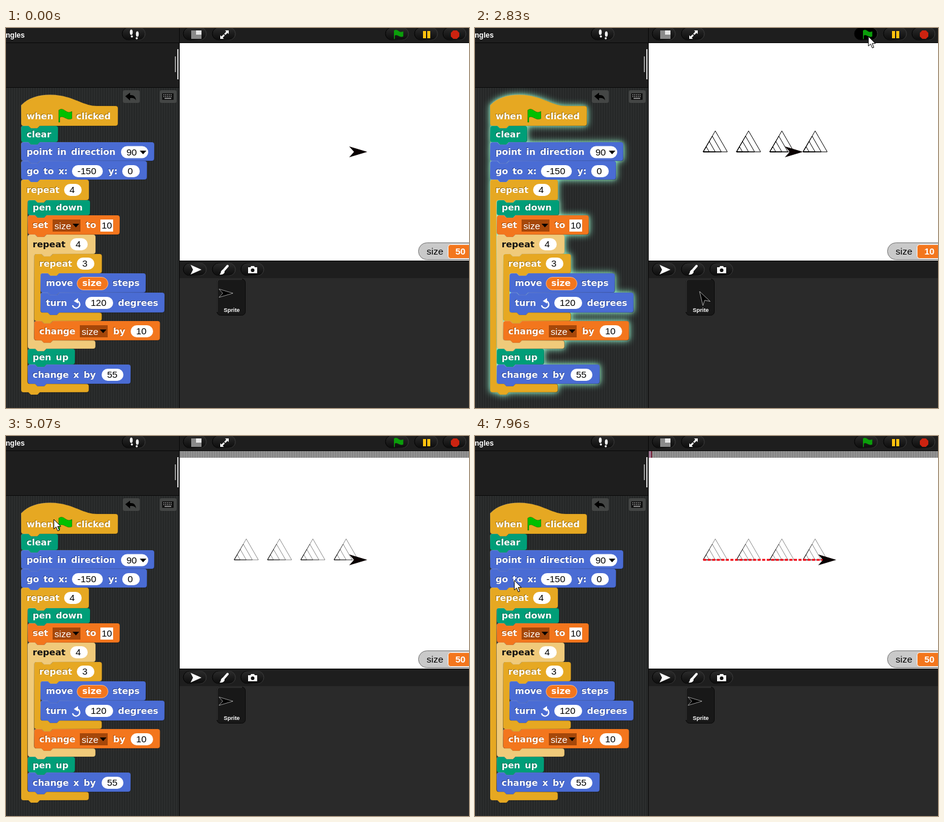
Write an HTML page that moves like this. It is 765 by 629 pixels and loops after 8000 ms.

```html
<!DOCTYPE html>
<html lang="en">
<head>
<meta charset="utf-8">
<title>Triangles</title>
<style>
  html, body { margin: 0; width: 100%; height: 100%; overflow: hidden; background: #1e1e1e; }
  svg { display: block; }
  text { white-space: pre; }
  .label { font: bold 14.6px "DejaVu Sans", sans-serif; word-spacing: 2.5px; }
  .input { font: 15.5px "Liberation Sans", Arial, sans-serif; }
  .bold { font: bold 15px "Liberation Sans", Arial, sans-serif; }
  .glow { filter: drop-shadow(0 0 2px #99ffd566) drop-shadow(0 0 6px #99ffd5); }
</style>
</head>
<body>
<svg id="stage" width="765" height="629" viewBox="0 0 765 629">
  <defs>
    <linearGradient id="bevel" x2="1" y2="1">
      <stop stop-color="#fff" stop-opacity=".2"/>
      <stop offset=".5" stop-color="#000" stop-opacity=".08"/>
      <stop offset="1" stop-color="#000" stop-opacity=".35"/>
    </linearGradient>
    <linearGradient id="pill" x2="0" y2="1">
      <stop stop-color="#2c2c2c"/><stop offset="1" stop-color="#0c0c0c"/>
    </linearGradient>
    <linearGradient id="rim" x2="1" y2="0">
      <stop stop-color="#000"/><stop offset="1" stop-color="#3c3c3c"/>
    </linearGradient>
    <pattern id="weave" width="4" height="4" patternUnits="userSpaceOnUse">
      <path fill="#252727" d="M0 0h4v4H0z"/><path fill="#2c2e2e" d="M1 0h2v4H1z"/>
    </pattern>
    <pattern id="ticks" width="4" height="12" patternUnits="userSpaceOnUse">
      <path fill="#929292" d="M0 0h4v12H0z"/><path fill="#7d7d7d" d="M0 0h1v12H0z"/>
    </pattern>
    <path id="arrow" d="M0 0-30-9-22 0-30 9Z"/>
    <path id="flag" d="M0 1C4-2 7-1 11 2S18 5 22 3L22 15C18 17 15 16 11 14S5 11 2 13V21H0Z"/>
  </defs>
</svg>
<script>
const LOOP = 8000;
const GOLD = '#e6a822', PALE = '#f0ca7a', PEN = '#009e78', MOTION = '#4a6cd4', VARS = '#f3761d';
const svg = document.getElementById('stage');
const add = html => svg.insertAdjacentHTML('beforeend', html);
const $ = id => document.getElementById(id);

const rect = (x, y, w, h, fill, more = '') =>
  `<rect x="${x}" y="${y}" width="${w}" height="${h}" fill="${fill}" ${more}/>`;
const text = (x, y, s, cls, fill, more = '') =>
  `<text x="${x}" y="${y}" class="${cls}" fill="${fill}" ${more}>${s}</text>`;
const shape = (d, fill, more = '') => `<path d="${d}" fill="${fill}" ${more}/>`;
const line = (d, color, width = 1, more = '') =>
  shape(d, 'none', `stroke="${color}" stroke-width="${width}" ${more}`);

// block outlines
const DENT = 'h8l4 4h11l4-4', NOTCH = 'l-4 4h-11l-4-4';
const top_ = (x, y, w) => `M${x} ${y + 4}q0-4 4-4${DENT}H${x + w - 4}q4 0 4 4`;
const bottom = (x, y, w) => `V${y - 4}q0 4-4 4H${x + 31}${NOTCH}H${x + 4}q-4 0-4-4Z`;
const solid = (d, fill) => shape(d, fill) + line(d, 'url(#bevel)', 1.2);
const block = (x, y, w, h, fill) => solid(top_(x, y, w) + bottom(x, y + h, w), fill);
const loop = (x, y, head, foot, fill) => {
  const w = 112, ix = x + 10.5;
  return solid(top_(x, y, w) +
    `V${head - 4}q0 4-4 4H${ix + 31}${NOTCH}H${ix + 4}q-4 0-4 4V${foot - 4}q0 4 4 4` +
    `H${x + w - 4}q4 0 4 4` + bottom(x, foot + 14, w), fill);
};
const label = (x, y, s, fill = '#fff') =>
  (fill === '#fff' ? text(x - 1, y - 1, s, 'label', '#000', 'opacity=".3"') : '') +
  text(x, y, s, 'label', fill);
const field = (x, cy, w, s) =>
  rect(x, cy - 10, w, 20, '#fff', 'rx="10"') + text(x + 9, cy + 5, s, 'input', '#000');
const menu = (x, y) => rect(x, y, 46, 20, '#a5470a') +
  text(x + 3, y + 15.5, 'size', 'input', '#fff') +
  shape(`M${x + 33} ${y + 7}h11l-5.5 6z`, '#000');

// toolbar and panes
const button = (cx, cy, id = '') =>
  rect(cx - 19, cy - 11, 38, 21, 'url(#pill)', `rx="10.5" stroke="url(#rim)" ${id}`);
const panes = rect(0, 0, 765, 629, '#1e1e1e') +
  rect(0, 99, 286, 530, 'url(#weave)') + rect(0, 98, 286, 1, '#0a0a0a') +
  rect(287, 414, 478, 215, '#2a2a2a') + rect(286, 0, 1, 629, '#080808') +
  rect(287, 385, 478, 1, '#080808') + rect(0, 24, 765, 1, '#080808') +
  rect(287, 25, 478, 360, '#fff') +
  rect(283, 35, 2, 50, '#ddd') + rect(279, 47, 1.5, 26, '#bbb') +
  text(-.5, 15.5, 'ngles', '', '#fff', 'font-family="Liberation Sans, sans-serif" font-weight="bold" font-size="12"');
const tools = [211, 312, 360, 694, 741].map(x => button(x, 10)).join('') +
  button(646, 10, 'id="go"') + [312, 360, 407].map(x => button(x, 400)).join('') +
  // footprints
  '<g fill="#fff"><ellipse cx="207" cy="7" rx="2.3" ry="4.5"/><circle cx="208" cy="14" r="1.7"/>' +
  '<ellipse cx="217" cy="10" rx="2.3" ry="4.5"/><circle cx="216" cy="17" r="1.7"/></g>' +
  rect(306, 4, 17, 14, '#8a8a8a') + rect(314, 4, 9, 7, '#e6e6e6') +
  shape('M362 4h6v6l-2-2-3.500 3.500-2-2L364 6zM360 18h-6v-6l2 2 3.500-3.500 2 2L358 16z', '#fff') +
  '<use href="#flag" fill="#0a9e0a" transform="translate(641 3.500) scale(.7)"/>' +
  rect(689, 5, 5, 12, '#ffc20e') + rect(696, 5, 5, 12, '#ffc20e') +
  shape('M739 4h6l4 4v6l-4 4h-6l-4-4V8z', '#cc2310') +
  // corral icons
  shape('M305 392 323 400 305 408 309 400Z', '#fff') +
  line('M366 394 359 402', '#fff', 4, 'stroke-linecap="round"') +
  shape('M358 400q4 1 3 5-3 4-8 3 2-2 2-4t3-4z', '#fff') +
  shape('M400 396h4l1-2h5l1 2h4v10h-15z', '#fff') +
  '<circle cx="407.5" cy="401" r="3" fill="#111"/>' +
  // undo and keyboard
  rect(193, 103, 28, 21, '#444645', 'rx="3"') + rect(254, 103, 28, 21, '#444645', 'rx="3"') +
  shape('M197 113l8-6v4q9-1 10 9-3-5-10-4v4z', '#000') +
  rect(258, 108, 19, 11, '#111', 'rx="1"') +
  line('M260 110.500h15M260 113.500h15', '#aaa', 1.5, 'stroke-dasharray="1.5 1.500"') +
  line('M262 116.500h11', '#aaa', 1.5);

const script = '<g id="script">' +
  solid('M25 128C40 112 65 108 90 112S130 129 150 129H181q4 0 4 4' + bottom(25, 162, 160), GOLD) +
  block(25, 162, 61, 27, PEN) + block(25, 189, 220, 31, MOTION) + block(25, 220, 208, 31, MOTION) +
  loop(25, 251, 285, 589, GOLD) +
  block(36, 285, 103, 25, PEN) + block(36, 310, 152, 32, VARS) +
  loop(36, 342, 374, 517, PALE) + loop(46.5, 374, 406, 471, GOLD) +
  block(57, 406, 174, 32, MOTION) + block(57, 438, 205, 33, MOTION) +
  block(46.5, 485, 208, 32, VARS) + block(36, 531, 78, 26, PEN) + block(36, 557, 170, 32, MOTION) +
  '</g>' +
  label(34, 151, 'when') +
  '<use href="#flag" fill="#00c000" stroke="#000" stroke-opacity=".25" transform="translate(87 135)"/>' +
  label(116, 151, 'clicked') + label(34, 181, 'clear') +
  label(34, 210, 'point in direction') + field(190, 205.5, 45, '90') +
  shape('M221 203h11l-5.500 6z', '#000') +
  label(34, 242, 'go to x:') + field(109, 237, 51, '-150') +
  label(169, 242, 'y:') + field(192, 237, 29, '0') +
  label(34, 273, 'repeat') + field(96, 268, 29, '4') +
  label(44, 302, 'pen down') +
  label(44, 331, 'set') + menu(77, 317) + label(132, 331, 'to') +
  rect(156, 317, 21, 20, '#fff') + text(158, 332, '10', 'input', '#000') +
  label(44, 363, 'repeat', '#111') + field(106, 358, 29, '4') +
  label(55, 395, 'repeat') + field(117, 390, 29, '3') +
  label(66, 427, 'move') +
  rect(117.5, 412.5, 51, 21, VARS, 'rx="10.5" stroke="#ffb27a"') +
  text(126, 427, 'size', 'label', '#fff') + label(176, 427, 'steps') +
  label(66, 460, 'turn') +
  line('M118 452A6 6 0 1 1 110 459', '#fff', 2) + shape('M119 447v9l-7-4z', '#fff') +
  field(131, 455, 46, '120') + label(185, 460, 'degrees') +
  label(55, 507, 'change') + menu(122, 492) + label(177, 507, 'by') + field(206, 502, 37, '10') +
  label(44, 550, 'pen up') + label(44, 579, 'change x by') + field(158, 574, 36, '55');

const scene = '<g id="ruler">' + rect(287, 25, 478, 11, 'url(#ticks)') + '</g>' +
  rect(287, 25, 2, 11, '#b06a9a', 'id="done" opacity=".6"') + rect(289, 25, 1.5, 11, '#6d0a20', 'id="mark"') +
  '<path id="trail" fill="none" stroke="#000"/>' +
  '<path id="route" fill="none" stroke="#f00010" stroke-width="3" stroke-dasharray="5 2.500"/>' +
  line('M600 203H597V207H600', '#e02020', 1.3, 'id="dot"') +
  '<use id="sprite" href="#arrow" fill="#0a0000"/>' +
  rect(681.5, 355.5, 110, 28, '#c9c9c9', 'rx="14" stroke="#777"') +
  text(695, 375, 'size', 'input', '#000') +
  rect(730.5, 358.5, 50, 23, VARS, 'rx="4" stroke="#fff"') +
  text(742.5, 375, '50', 'bold', '#fff', 'id="size"') +
  rect(348.5, 415.5, 47, 60, '#181818', 'rx="6" stroke="#0a0a0a"') +
  line('M349 470V421q0-5 6-5H390', '#444') +
  '<use id="icon" href="#arrow" fill="#000" stroke="#bbb"/>' +
  text(373, 470, 'Sprite', '', '#fff',
    'font-family="Liberation Sans, sans-serif" font-weight="bold" font-size="9.3" text-anchor="middle"');

const pointer = '<circle id="click" cx="650" cy="14" r="12" fill="#e6e600" opacity=".55"/>' +
  '<path id="cursor" d="M0 0V16L3.700 12.500 6.500 19 9 18 6.300 11.700H11.500Z" fill="#fff" stroke="#000"/>';
add(panes + tools + script + scene + pointer);

// share of a stepped change done at time t: n steps, first at s, last at e
const steps = (t, s, e, n) =>
  t < s ? 0 : t >= e ? 1 : (Math.floor((t - s) / (e - s) * (n - 1) + 1e-6) + 1) / n;
const smooth = p => p * p * (3 - 2 * p);
const linear = p => p;

// start, end, steps, target x, target y, easing
const path = [
  [260, 1030, 12, 652, 25, smooth],
  [1100, 1240, 3, 650, 14, linear],
  [3350, 3770, 7, 577, 105, smooth],
  [4030, 4800, 12, 96, 127, smooth],
  [4870, 5210, 6, 62, 149, linear],
  [5400, 5680, 5, 50, 170, smooth],
  [6340, 6910, 9, 65, 213, smooth],
  [7830, 7960, 3, 65, 239, linear]
];
function cursorAt(t) {
  let x = 692, y = 573;
  for (const [s, e, n, tx, ty, ease] of path) {
    if (t < s) break;
    const p = ease(steps(t, s, e, n));
    x += (tx - x) * p;
    y += (ty - y) * p;
  }
  return [x, y];
}

// pen state after k of the 48 moves
const MOVES = 48;
function turtle(k) {
  const x0 = 377 + 55 * Math.min(3, Math.floor(k / 12));
  const size = 10 * (Math.floor(k / 3) % 4 + 1);
  const corner = k % 3;
  return {
    size, turn: -120 * corner,
    x: x0 + [0, size, size / 2][corner],
    y: 205 - (corner === 2 ? size * Math.sqrt(3) / 2 : 0)
  };
}
function trail(k) {
  let d = '';
  for (let i = 0; i < k; i++) {
    const a = turtle(i), r = a.turn * Math.PI / 180;
    d += `M${a.x} ${a.y}l${a.size * Math.cos(r)} ${a.size * Math.sin(r)}`;
  }
  return d;
}

const show = (id, on) => $(id).setAttribute('visibility', on ? 'visible' : 'hidden');
const place = (id, x, y, more = '') => $(id).setAttribute('transform', `translate(${x} ${y}) ${more}`);

function draw(t) {
  const [cx, cy] = cursorAt(t);
  place('cursor', cx, cy);
  show('cursor', t >= 260);
  show('click', t >= 1650 && t < 1850);
  $('go').setAttribute('fill', t >= 1100 && cy < 25 ? '#000' : 'url(#pill)');

  const running = t >= 1780 && t < 2890;
  $('script').classList.toggle('glow', running);
  const k = Math.floor(MOVES * steps(t, 1850, 2830, 15));
  $('trail').setAttribute('d', trail(k));
  const pen = running ? turtle(k) : { x: 597, y: 205, turn: 0, size: 50 };
  place('sprite', pen.x, pen.y, `rotate(${pen.turn})`);
  $('size').textContent = pen.size;
  if (t >= 1850 && t < 3770) place('icon', 371, 436, 'rotate(-120) scale(.77)');
  else place('icon', 375, 439, 'scale(.77)');

  const fade = steps(t, 4030, 4800, 12);
  $('ruler').setAttribute('opacity', fade);
  $('trail').setAttribute('stroke-opacity', 1 - .55 * fade);

  const last = steps(t, 7830, 7960, 3);
  show('mark', t >= 5610);
  show('done', t >= 5610);
  $('mark').setAttribute('x', 288 + steps(t, 6340, 6910, 9) + 2 * last);
  $('done').setAttribute('width', 1 + steps(t, 6340, 6910, 9) + 3 * last);
  show('dot', t >= 5610 && t < 7830);
  $('route').setAttribute('d', last ? `M${597 - 220 * last} 205H590` : '');
}

function tick() {
  draw(performance.now() % LOOP);
  requestAnimationFrame(tick);
}
tick();
</script>
</body>
</html>
```
